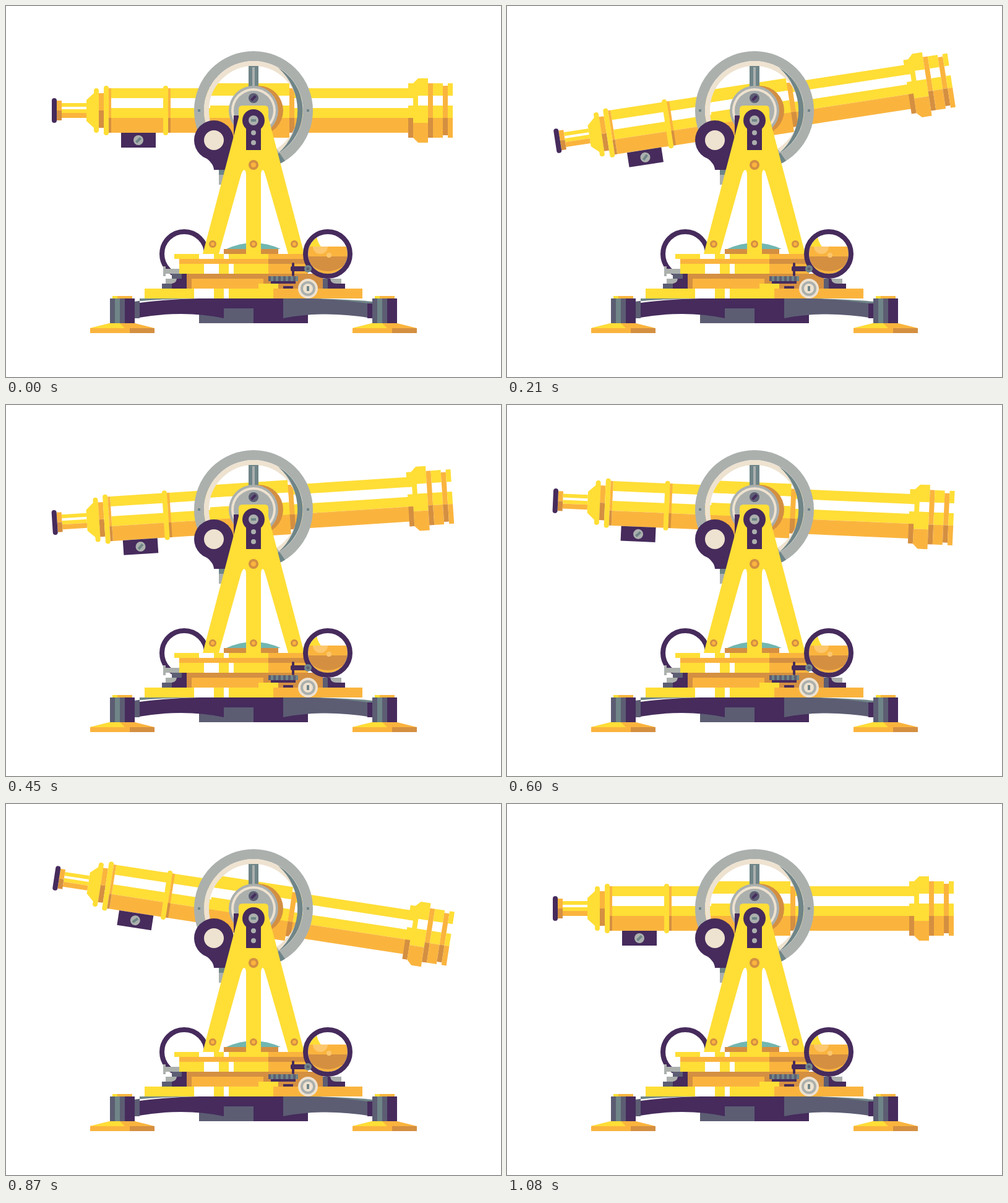
An HTML page for the animation above (1.11 s loop, 800x600 px).

```html
<!DOCTYPE html>
<html lang="en">
<head>
<meta charset="utf-8">
<title>Tilting telescope</title>
<style>
html, body { margin: 0; width: 100%; height: 100%; overflow: hidden; background: #fff; }
svg { display: block; width: 800px; height: 600px; }
</style>
</head>
<body>
<svg id="stage" viewBox="0 0 800 600" xmlns="http://www.w3.org/2000/svg"></svg>
<script>
const Y = '#ffde36', O = '#fab43e', B = '#d48f41', P = '#462b5c', S = '#5c5d73',
      T = '#6f8588', G = '#abb0ad', C = '#eee2d0', W = '#fff', AQUA = '#70b6b1';

// Boxes take left, top, right, bottom.
const box = (x1, y1, x2, y2, fill, r = 0) =>
  `<rect x="${x1}" y="${y1}" width="${x2 - x1}" height="${y2 - y1}" rx="${r}" fill="${fill}"/>`;
const disc = (x, y, r, fill) => `<circle cx="${x}" cy="${y}" r="${r}" fill="${fill}"/>`;
const hoop = (x, y, r, width, color) =>
  `<circle cx="${x}" cy="${y}" r="${r}" fill="none" stroke="${color}" stroke-width="${width}"/>`;
const shape = (d, fill) => `<path d="${d}" fill="${fill}"/>`;
const bolt = (x, y, r) => disc(x, y, r, B) + disc(x, y, r / 2, O);
const slash = (x, y, color) =>
  `<g transform="rotate(-45 ${x} ${y})">${box(x - 5, y - 2, x + 5, y + 2, color)}</g>`;

// A row of adjoining boxes: each color runs from the previous edge to its own.
const row = (y1, y2, x, ...cells) => cells.map(([end, fill]) => {
  const cell = box(x, y1, end, y2, fill);
  x = end;
  return cell;
}).join('');

function tube() {
  const band = (x1, x2, top, bottom) =>
    box(x1, top, x2, 181, O) + box(x1, 181, x2, bottom, B);
  const barrel = (x1, x2, y1, y2, y3, y4) =>
    box(x1, y1, x2, y2, Y) + box(x1, y3, x2, 181, Y) + box(x1, 181, x2, y4, O);
  const flange = x => box(x, 129, x + 8, 209, Y, 4) + band(x + 8, x + 12, 133, 205);
  return [
    box(82, 153, 90, 169, O), box(82, 169, 90, 185, B),
    box(74, 149, 82, 189, P, 4),
    box(90, 157, 130, 163, Y), box(90, 167, 130, 173, Y), box(90, 173, 130, 181, O),
    shape('M130 152L142 141H150V197H142L130 186Z', Y),
    box(142, 133, 150, 205, Y, 4),
    box(150, 141, 158, 169, O), box(150, 169, 158, 197, B),
    barrel(170, 658, 133, 149, 165, 205),
    flange(158), flange(254),
    box(186, 205, 242, 229, P), disc(214, 217, 8, G), slash(214, 217, T),
    box(330, 145, 458, 161, W),
    barrel(330, 458, 125, 145, 161, 213),
    band(458, 466, 133, 205),
    shape('M650 125H658L666 117H682V145H666V161H682V189H658V181H650V161H658V149H650Z', Y),
    box(650, 181, 658, 213, B),
    shape('M658 189H682V221H666L658 213Z', O),
    band(682, 690, 125, 213),
    barrel(690, 706, 125, 145, 161, 213),
    band(706, 714, 129, 209),
    barrel(714, 722, 125, 145, 161, 213)
  ].join('');
}

function wheel() {
  return [
    hoop(400, 169, 88, 16, G),
    hoop(400, 169, 76, 8, C),
    shape('M440 100A80 80 0 0 1 440 238A92 92 0 0 0 440 100', T),
    `<g clip-path="url(#legShade)">${hoop(400, 169, 88, 16, T)}${hoop(400, 169, 76, 8, G)}</g>`,
    box(310, 167, 314, 171, T), box(486, 167, 490, 171, T),
    box(392, 97, 408, 131, T), box(398, 99, 402, 131, G),
    disc(408, 169, 40, B),
    disc(400, 169, 40, G), disc(400, 169, 36, C), disc(400, 169, 32, G),
    disc(400, 149, 8, S), slash(400, 149, P)
  ].join('');
}

function crank() {
  return [
    box(344, 265, 358, 273, T), box(344, 273, 358, 289, G),
    shape('M317 242C330 249 336 258 336 265H360L368 217Z', P),
    disc(336, 217, 32, P), disc(336, 217, 16, C),
    box(368, 177, 380, 209, P)
  ].join('');
}

function tower() {
  return [
    shape('M356 393Q400 373 444 393Z', AQUA), box(352, 393, 440, 401, B),
    shape('M376 167Q376 161 382 161H418Q424 161 424 167V180L482 401H456L420 276' +
          'Q417 265 415 265Q412 265 412 275V401H388V275Q388 265 385 265' +
          'Q382 265 379 276L344 401H318L376 180Z', Y),
    disc(400, 185, 18, P), box(388, 185, 412, 233, P),
    disc(400, 185, 8, G), box(396, 183, 404, 187, T),
    disc(400, 205, 4, G), disc(400, 221, 4, G),
    bolt(400, 257, 8), bolt(334, 385, 6), bolt(400, 385, 6), bolt(466, 385, 6)
  ].join('');
}

function tiers() {
  return [
    box(268, 433, 292, 457, P), box(268, 433, 284, 441, S), box(252, 449, 268, 457, S),
    shape('M258 441H276Q275 449 266 449H258Z', G),
    box(254, 421, 258, 437, G), box(258, 425, 284, 433, G),
    box(512, 441, 534, 457, P), box(512, 441, 520, 449, S), box(520, 449, 548, 457, P),
    box(512, 449, 520, 457, S),
    shape('M524 441H542V449H534Q525 449 524 441Z', G),
    row(401, 409, 272, [312, Y], [336, W], [352, Y], [360, W], [424, Y], [488, O]),
    row(409, 417, 280, [424, O], [488, B]),
    row(417, 433, 280, [320, Y], [344, W], [360, Y], [368, W], [424, Y], [488, O]),
    box(292, 433, 512, 457, B), box(300, 441, 416, 457, O),
    row(457, 473, 224, [304, Y], [336, W], [352, Y], [360, W], [432, Y], [576, O]),
    box(408, 449, 440, 457, Y)
  ].join('');
}

function globe() {
  return [
    disc(520, 401, 38, W),
    '<g clip-path="url(#glass)">',
    shape('M488 373H502Q504 383 509 389H488Z', Y),
    box(488, 389, 552, 405, O), box(488, 405, 552, 433, B),
    shape('M494 420Q520 438 546 420V434H494Z', O),
    shape('M496 389H520A12 12 0 0 1 496 389', '#fcc76d'),
    '</g>',
    disc(522, 403, 4, '#fcc76d'),
    hoop(520, 401, 36, 8, P)
  ].join('');
}

function gears() {
  let teeth = '';
  for (let x = 428; x < 472; x += 8) teeth += box(x, 437, x + 4, 445, T);
  return [
    box(424, 437, 472, 445, S), teeth,
    box(428, 445, 468, 449, P), box(448, 453, 464, 457, P),
    box(462, 415, 466, 437, P, 2), box(460, 421, 484, 429, P, 2),
    disc(488, 425, 6, T), disc(488, 425, 2.5, S),
    disc(488, 457, 16, C), disc(488, 457, 12, G), disc(488, 457, 8, C),
    box(486, 453, 490, 461, T)
  ].join('');
}

function beam() {
  return [
    box(312, 473, 488, 513, P), box(312, 497, 352, 513, S), box(352, 489, 400, 513, S),
    shape('M208 478Q260 473 320 473H216V481L208 482Z', T),
    shape('M208 481Q260 474 312 473H352V505Q286 491 208 505Z', P),
    shape('M208 478L216 477V505H208Z', S),
    shape('M480 473Q540 473 592 478V482Z', T),
    shape('M448 473H488Q540 474 592 482V505Q514 492 448 505Z', S),
    box(584, 481, 592, 505, P)
  ].join('');
}

function foot(dx) {
  return `<g transform="translate(${dx})">` + [
    row(469, 473, 172, [180, Y], [204, O]),
    row(473, 513, 168, [176, S], [184, T], [192, S], [208, P]),
    shape('M136 521L168 513H208L240 521Z', O),
    shape('M136 521L168 513H184L192 521Z', Y),
    row(521, 529, 136, [200, O], [240, B])
  ].join('') + '</g>';
}

document.getElementById('stage').innerHTML = `
  <defs>
    <clipPath id="glass"><circle cx="520" cy="401" r="32"/></clipPath>
    <clipPath id="legShade"><path d="M424 200L452 270H430L424 240ZM436 229L452 252V270H430Z"/></clipPath>
  </defs>
  ${hoop(288, 401, 36, 8, P)}
  <g id="tube">${tube()}</g>
  ${wheel()}${crank()}${tower()}${tiers()}${globe()}${gears()}${beam()}${foot(0)}${foot(424)}`;

const tubeGroup = document.getElementById('tube');
const STEP = 30, STEPS = 37, HALF = 18, PEAK = 8, DEGREES = 1.25;

// Tilts up, rests, returns, then mirrors the swing downwards.
function draw(time) {
  const step = Math.floor(time / STEP) % STEPS;
  const phase = step % HALF;
  const tilt = DEGREES * Math.min(phase, HALF - phase, PEAK);
  tubeGroup.setAttribute('transform', `rotate(${step < HALF ? -tilt : tilt} 400 169)`);
}

const start = performance.now();
function tick() {
  draw(performance.now() - start);
  requestAnimationFrame(tick);
}
draw(0);
requestAnimationFrame(tick);
</script>
</body>
</html>
```
